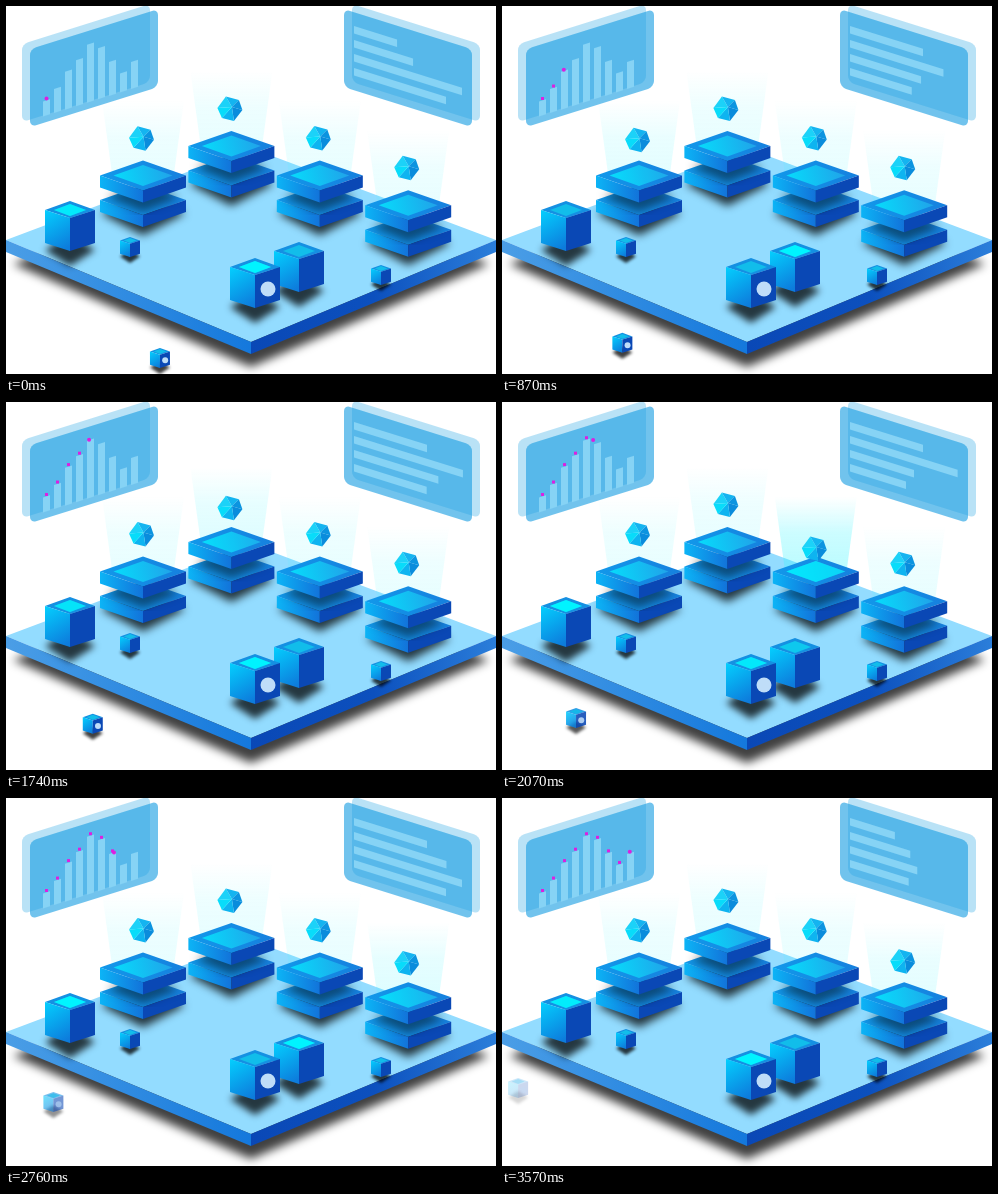
Recreate the animation shown at these times as an HTML page with a canvas. Size 490 by 368 pixels, loop 3.6 s.

```html
<!DOCTYPE html>
<html>
<head>
<meta charset="utf-8">
<style>
html, body { margin: 0; overflow: hidden; background: #fff; }
canvas { display: block; }
</style>
</head>
<body>
<canvas id="stage" width="490" height="368"></canvas>
<script>
const ctx = document.getElementById('stage').getContext('2d');
const LOOP = 3600, SLOPE = 0.3125, TAU = 2 * Math.PI;
const clamp = v => Math.max(0, Math.min(1, v));

function poly(fill, ...pts) {
  ctx.fillStyle = fill;
  ctx.beginPath();
  for (let i = 0; i < pts.length; i += 2) ctx.lineTo(pts[i], pts[i + 1]);
  ctx.closePath();
  ctx.fill();
}

function gradient(x1, y1, x2, y2, ...colors) {
  const g = ctx.createLinearGradient(x1, y1, x2, y2);
  colors.forEach((c, i) => g.addColorStop(i / (colors.length - 1), c));
  return g;
}

function at(x, y, scale, draw) {
  ctx.save();
  ctx.translate(x, y);
  ctx.scale(scale, scale);
  draw();
  ctx.restore();
}

function disc(color, x, y, r) {
  ctx.fillStyle = color;
  ctx.beginPath();
  ctx.arc(x, y, r, 0, TAU);
  ctx.fill();
}

// Rhombus centred on (0, y); back and front are its two half heights.
function rhombus(fill, w, y, back, front = back) {
  poly(fill, -w, y, 0, y - back, w, y, 0, y + front);
}

function shadow(blur, alpha, w, y, h) {
  ctx.filter = `blur(${blur}px)`;
  rhombus(`rgba(0,0,0,${alpha})`, w, y, h);
  ctx.filter = 'none';
}

// Isometric block whose left corner is at (-w, 0).
function block(w, back, front, depth, top, left, right) {
  rhombus(top, w, 0, back, front);
  poly(left, -w, 0, 0, front, 0, front + depth, -w, depth);
  poly(right, w, 0, 0, front, 0, front + depth, w, depth);
}

function panel(mirror) {
  ctx.save();
  if (mirror) ctx.transform(-1, 0, 0, 1, 490, 0);
  ctx.transform(1, -SLOPE, 0, 1, 16, 38);
  for (const [x, y, alpha] of [[0, 0, 0.31], [8, 7.5, 0.63]]) {
    ctx.fillStyle = `rgba(31,160,226,${alpha})`;
    ctx.beginPath();
    ctx.roundRect(x, y, 128, 78, 6);
    ctx.fill();
  }
  ctx.restore();
}

const BAR = '#86d3f5', DOT = '#dc20e0';
const heights = [15, 24, 38, 46, 58, 51, 34, 19, 27];
const barX = i => 37 + 11 * i;
const baseY = i => 110.5 - 11 * SLOPE * i;
const dotY = i => baseY(i) - heights[i] - 3;

function columns(t) {
  heights.forEach((h, i) => {
    const x = barX(i), y = baseY(i);
    poly(BAR, x, y - h, x + 7, y - h - 2.2, x + 7, y - 2.2, x, y);
  });
  const pos = t / LOOP * (heights.length - 1), n = Math.floor(pos);
  ctx.fillStyle = DOT;
  for (let i = 0; i <= n; i++) ctx.fillRect(barX(i) + 2, dotY(i) - 1.5, 3, 3);
  disc(DOT, barX(pos) + 3.5, dotY(n) + (dotY(n + 1) - dotY(n)) * (pos - n), 2);
}

// Rows collapse and regrow seven times per loop.
function rowChart(t) {
  const arch = Math.sin(Math.PI * t / LOOP);
  const wave = Math.cos(TAU * t / 1380);
  const grow = clamp(Math.abs(t % (LOOP / 7) - 270) / 70);
  const lengths = [43 + 30 * clamp(2.5 * arch), 59 + 50 * arch, 86 + 22 * wave, 74 + 18 * wave];
  lengths.forEach((length, i) => {
    const w = length * grow, y = 20 + 14 * i, dy = w * SLOPE;
    poly(BAR, 348, y, 348 + w, y + dy, 348 + w, y + dy + 7.5, 348, y + 7.5);
  });
}

function platform() {
  at(245, 234, 1, () => {
    shadow(5, 0.75, 238, 24, 103);
    block(245, 92, 102, 12, '#93dcff',
      gradient(-245, 0, 0, 0, '#4b9ee6', '#1478dc'),
      gradient(0, 0, 245, 0, '#0a48b6', '#0c50be', '#2b7eda'));
  });
}

function slab() {
  block(43, 15, 15, 12, gradient(-43, 0, 43, 0, '#1298ea', '#1680de'),
    gradient(-43, 0, 0, 0, '#0cb4f6', '#1273da'), '#0a48b5');
}

function crystal() {
  const rim = [[-12.5, -1], [-4, -12.5], [9, -9], [12.5, 1], [4, 12], [-8, 9]];
  const shades = ['#1cd2f8', '#14b4f0', '#0c94e0', '#0a8cdc', '#0eb4f0', '#08dcfa'];
  rim.forEach((p, i) => poly(shades[i], ...p, ...rim[(i + 1) % 6], 2, -2));
}

function tower(i, power) {
  at(137 + 88.4 * i, 140 + 29.6 * Math.abs(i - 1), 1, () => {
    shadow(4, 0.75, 42, 38, 22);
    at(0, 24.5, 1, () => {
      slab();
      ctx.beginPath();
      ctx.rect(-43, -15, 86, 30);
      ctx.save();
      ctx.clip();
      shadow(4, 0.45, 36, -3, 15);
      ctx.restore();
    });
    const beam = a => `rgba(60,245,255,${a * (0.12 + 0.38 * power)})`;
    poly(gradient(0, -75, 0, -2, beam(0), beam(0.75), beam(1)),
      -41, -75, 41, -75, 31, -2, -31, -2);
    slab();
    rhombus(gradient(-25, 5, 25, -7, '#08d8fa', '#1fa6ea'), 29.5, 0, 10.5);
    rhombus(`rgba(0,242,255,${power})`, 29.5, 0, 10.5);
    at(-1.5, -37 + 24 * power, 1, crystal);
  });
}

function cube(x, y, scale, glow, badge) {
  at(x, y, scale, () => {
    shadow(3.5 * scale, 0.75, 25, 40, 16);
    block(25, 9, 8, 33, '#1590e2',
      gradient(-25, 2, -3, 38, '#04ccfd', '#0d7cdc'), '#0a48b5');
    rhombus('#12bdea', 16, 0, 6);
    rhombus(`rgba(0,244,255,${glow})`, 16, 0, 6);
    if (badge) disc('#bfddf8', 13, 22, 7.5);
  });
}

function draw(t) {
  ctx.clearRect(0, 0, 490, 368);
  panel(false);
  panel(true);
  columns(t);
  rowChart(t);
  platform();

  // Each tower in turn powers up and back down.
  const turn = t / (LOOP / 4), active = Math.floor(turn);
  const power = 1 - Math.abs(2 * (turn - active) - 1);
  for (const i of [1, 0, 2, 3]) tower(i, i === active ? power : 0);

  const pulse = 0.5 + 0.5 * Math.cos(2 * TAU * t / LOOP);
  cube(64, 204, 1, clamp(0.8 - Math.sin(TAU * t / LOOP)));
  cube(293, 245, 1, 1 - pulse);
  cube(249, 261, 1, pulse, true);
  cube(124, 234.5, 0.4, 0);
  cube(375, 262.5, 0.4, 0);

  const p = t / LOOP;
  ctx.globalAlpha = 1 - 0.8 * clamp(2 * p - 1);
  cube(154 - 139 * p, 345.5 - 62.5 * p, 0.4, 0, true);
  ctx.globalAlpha = 1;
}

function tick() {
  draw(performance.now() % LOOP);
  requestAnimationFrame(tick);
}
tick();
</script>
</body>
</html>
```
